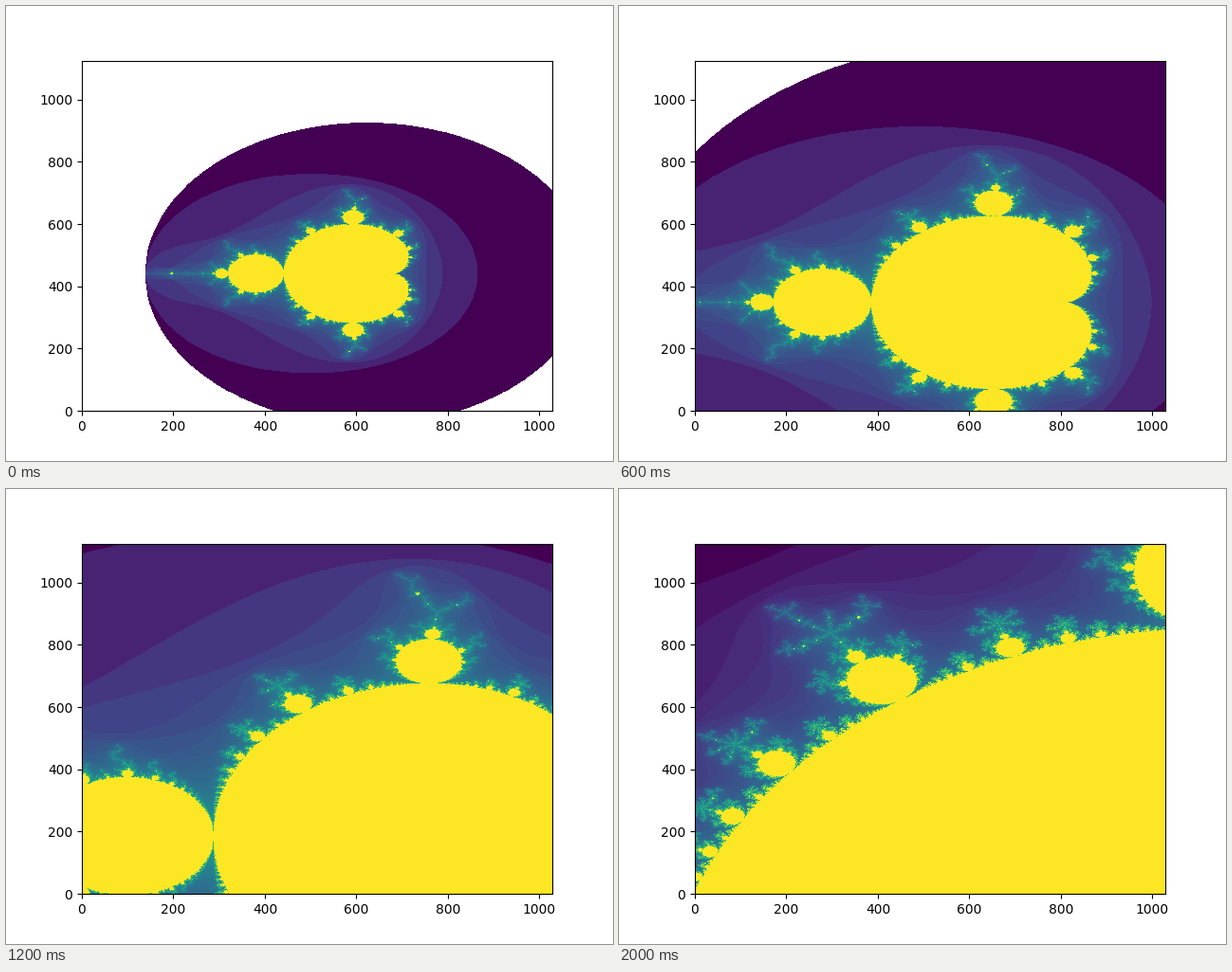
Recreate the animation shown at these times as a matplotlib script. Size 640x480 px, loop 2.2 s.

```python
import numpy as np
import matplotlib.pyplot as plt
from matplotlib.animation import FuncAnimation
from matplotlib.colors import LogNorm

W, H = 1028, 1125            # grid cells shown on the axes
CENTER = -0.45 + 0.5j        # point the zoom closes in on
SCALE = 242.3                # cells per unit at the start
MAX_ITER = 1000
STEPS = [*range(10), 11]     # the last frame skips one zoom step

# Stage pixels inside the axes frame (edges measured from the top left)
LEFT, RIGHT, TOP, BOTTOM = 80, 576, 58, 427
AX_BOTTOM, AX_HEIGHT = 427.2, 369.6

cols = np.arange(LEFT, RIGHT) + 0.5
rows = np.arange(TOP, BOTTOM) + 0.5
cell_x = np.floor((cols - LEFT) / (RIGHT - LEFT) * W) + 0.5 - W / 2
cell_y = np.floor((AX_BOTTOM - rows) / AX_HEIGHT * H) + 0.5 - H / 2
OFFSETS = cell_x[None, :] + 1j * cell_y[:, None]


def known_inside(c):
    """True in the main cardioid and the period-2 disc."""
    x, y2 = c.real, c.imag ** 2
    q = (x - 0.25) ** 2 + y2
    return (q * (q + x - 0.25) <= y2 / 4) | ((x + 1) ** 2 + y2 <= 1 / 16)


def escape_counts(c):
    """Number of iterates that stay within radius 2, up to MAX_ITER."""
    flat = c.ravel()
    counts = np.full(flat.size, MAX_ITER)
    live = np.flatnonzero(~known_inside(flat))
    c = z = flat[live]
    for n in range(MAX_ITER):
        out = z.real ** 2 + z.imag ** 2 > 4
        if out.any():
            counts[live[out]] = n
            keep = ~out
            live, c, z = live[keep], c[keep], z[keep]
        if not live.size:
            break
        z = z * z + c
    return counts.reshape(OFFSETS.shape)


def render(step):
    scale = SCALE * 8 ** (step / 11)
    counts = np.ma.masked_equal(escape_counts(CENTER + OFFSETS / scale), 0)
    norm = LogNorm(counts.min(), MAX_ITER)
    rgba = plt.get_cmap("viridis")(norm(counts))
    rgba[np.ma.getmaskarray(counts)] = 1
    return rgba


views = [render(step) for step in STEPS]

fig, ax = plt.subplots(figsize=(6.4, 4.8), dpi=100)
ax.set(xlim=(0, W), ylim=(0, H), facecolor="none")
image = fig.figimage(views[0], xo=LEFT, yo=480 - BOTTOM, origin="upper", zorder=-1)


def update(i):
    image.set_data(views[i])
    return [image]


anim = FuncAnimation(fig, update, frames=len(STEPS), interval=200,
                     repeat=True, repeat_delay=0)
plt.show()
```
